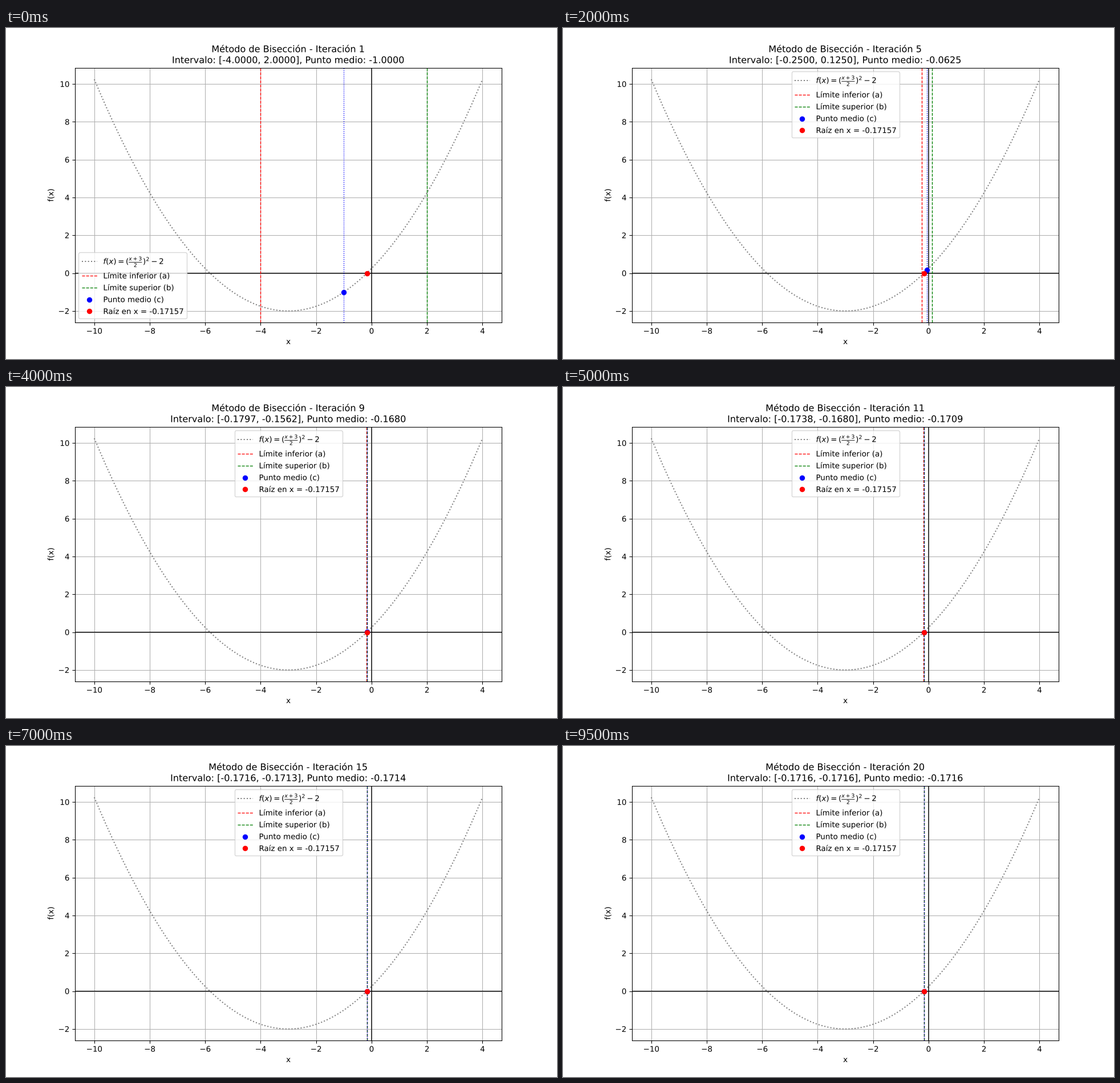
A matplotlib script that plays this animation: 966x580 px, repeating every 10000 ms.

```python
import matplotlib.pyplot as plt
import numpy as np
from matplotlib.animation import FuncAnimation
from matplotlib.patheffects import Normal
from matplotlib.text import Text

WIDTH, HEIGHT, DPI = 966, 580, 96.6
STEPS, STEP_MS = 20, 500
START = (-4.0, 2.0)
ROOT = 2 * np.sqrt(2) - 3


def f(x):
    return ((x + 3) / 2) ** 2 - 2


def bisect(a, b, steps):
    """Return the (a, b, midpoint) triple of every bisection step."""
    history = []
    for _ in range(steps):
        c = (a + b) / 2
        history.append((a, b, c))
        if f(a) * f(c) < 0:
            b = c
        else:
            a = c
    return history


history = bisect(*START, STEPS)

# The small surplus keeps the size from being truncated to one pixel less.
fig, ax = plt.subplots(
    figsize=((WIDTH + 1e-3) / DPI, (HEIGHT + 1e-3) / DPI), dpi=DPI)

x = np.linspace(-10, 4, 400)
ax.plot(x, f(x), color="gray", linestyle=":",
        label=r"$f(x) = (\frac{x+3}{2})^2 - 2$")
ax.axhline(0, color="black", linewidth=1, snap=False)
ax.axvline(0, color="black", linewidth=1, snap=False)

a0, b0, c0 = history[0]
lower = ax.axvline(a0, color="red", linestyle="--", linewidth=1,
                   label="Límite inferior (a)")
upper = ax.axvline(b0, color="green", linestyle="--", linewidth=1,
                   label="Límite superior (b)")
middle = ax.axvline(c0, color="blue", linestyle=":", linewidth=1)
point, = ax.plot([c0], [f(c0)], "o", color="blue", label="Punto medio (c)")
ax.plot([ROOT], [0], "o", color="red", label=f"Raíz en x = {ROOT:.5f}")

ax.set_xticks(range(-10, 5, 2))
ax.set_yticks(range(-2, 11, 2))
ax.set_xlim(-10.7, 4.7)
ax.set_ylim(-2.6125, 10.8625)
ax.set_xlabel("x")
ax.set_ylabel("f(x)")
ax.grid(True)
ax.title.set_linespacing(1.35)
legend = ax.legend(loc="lower left", labelspacing=0.58)

# Drawing text as outlines keeps its height from rounding to whole pixels.
for text in fig.findobj(Text):
    text.set_path_effects([Normal()])


def update(i):
    a, b, c = history[i]
    for line, pos in ((lower, a), (upper, b), (middle, c)):
        line.set_xdata([pos, pos])
    point.set_data([c], [f(c)])
    legend.set_loc("lower left" if i == 0 else "upper center")
    ax.set_title(f"Método de Bisección - Iteración {i + 1}\n"
                 f"Intervalo: [{a:.4f}, {b:.4f}], Punto medio: {c:.4f}")
    return lower, upper, middle, point, legend, ax.title


anim = FuncAnimation(fig, update, frames=STEPS, interval=STEP_MS,
                     repeat=True, repeat_delay=0, blit=False)
plt.show()
```
